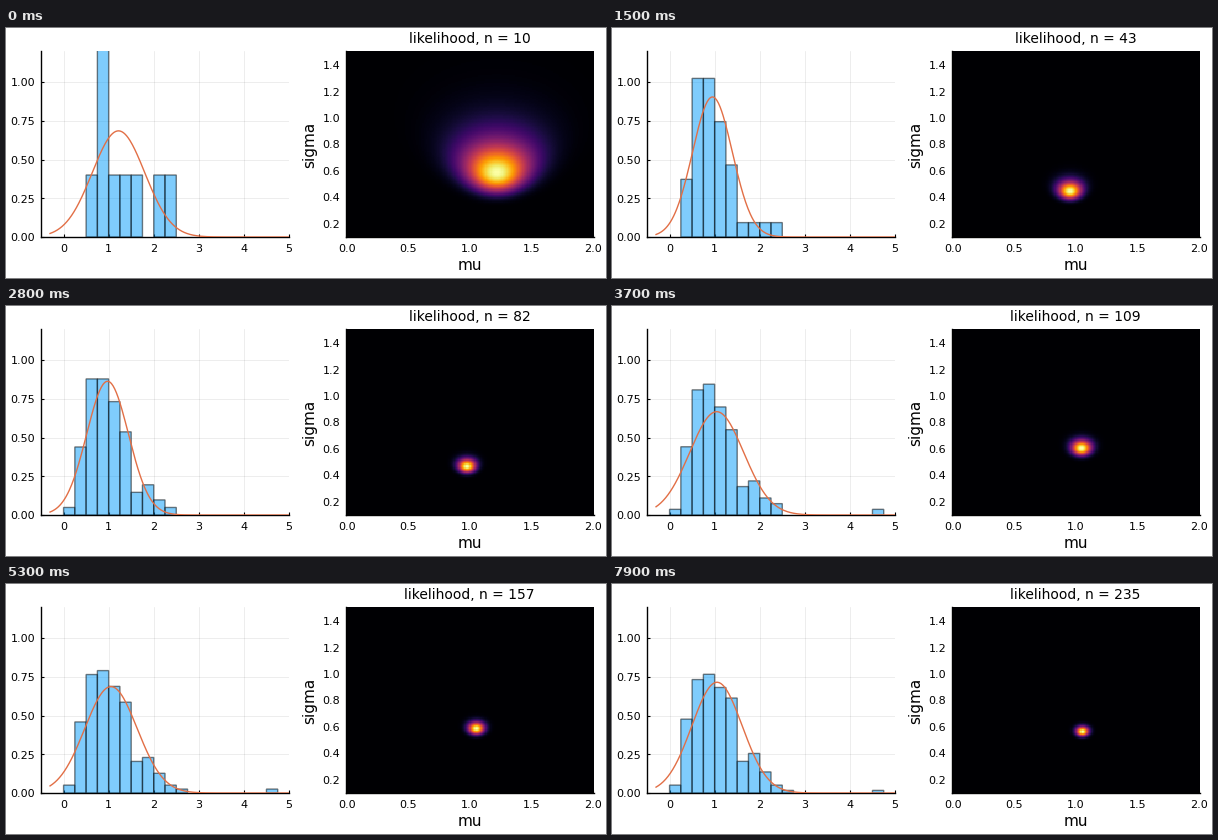
A matplotlib script that plays this animation: 600 by 250 pixels, repeating every 8 s.

```python
import numpy as np
import matplotlib.pyplot as plt
from matplotlib.animation import FuncAnimation

W, H, DPI = 600, 250, 100
TOP, BOTTOM = 23.0, 209.02
LEFT_PLOT = 35.02, 283.0
RIGHT_PLOT = 340.1, 588.0
BIN = 0.25
FRAMES, HOLD, START, STEP = 80, 4, 10, 3
OUTLIER, OUTLIER_AT = 4.72, 95

plt.rcParams["font.family"] = "DejaVu Sans"


def stream(counts):
    """Samples that fill the bins evenly, in proportion to their counts."""
    order = sorted(((k + 0.5) / c, b)
                   for b, c in enumerate(counts) for k in range(c))
    return [(b + 0.45) * BIN for _, b in order]


first = [0.57, 0.76, 0.78, 0.8, 0.85, 1.05, 1.35, 1.55, 2.1, 2.37]
early = stream([0, 4, 10, 7, 7, 4, 0, 1])
late = stream([3, 24, 32, 34, 32, 31, 11, 14, 7, 2, 1])
data = np.insert(first + early + late, OUTLIER_AT, OUTLIER)

fig = plt.figure(figsize=(W / DPI, H / DPI), dpi=DPI, facecolor="white")


def label(x, y, text, size=8, **kw):
    return fig.text(x / W, 1 - y / H, text, fontsize=size, **kw)


def add_axes(span, xlim, ylim):
    left, right = span
    ax = fig.add_axes([left / W, 1 - BOTTOM / H,
                       (right - left) / W, (BOTTOM - TOP) / H])
    ax.set(xlim=xlim, ylim=ylim)
    ax.spines[["top", "right"]].set_visible(False)
    ax.spines[["left", "bottom"]].set_linewidth(1)
    ax.tick_params(direction="in", length=2.2, width=0.8,
                   labelleft=False, labelbottom=False)
    ax.set_axisbelow(True)
    return ax


def add_ticks(ax, span, xs, ys, xfmt, yfmt):
    left, right = span
    x0, x1 = ax.get_xlim()
    y0, y1 = ax.get_ylim()
    ax.set_xticks(xs)
    ax.set_yticks(ys)
    for x in xs:
        px = left + (x - x0) / (x1 - x0) * (right - left)
        label(px, 224, format(x, xfmt), ha="center")
    for y in ys:
        py = BOTTOM - (y - y0) / (y1 - y0) * (BOTTOM - TOP)
        label(left - 6, py + 4.4, format(y, yfmt), ha="right")


# Histogram with the fitted normal density
hist = add_axes(LEFT_PLOT, (-0.5, 5), (0, 1.2))
add_ticks(hist, LEFT_PLOT, range(6), np.arange(5) * 0.25, "d", ".2f")
hist.grid(color="black", alpha=0.1, linewidth=0.5)
edges = np.arange(0, 5 + BIN, BIN)
bars = hist.bar(edges[:-1], np.zeros(len(edges) - 1), BIN, align="edge",
                facecolor=(0, 0.604, 0.98, 0.5), edgecolor=(0, 0, 0, 0.5),
                linewidth=1, zorder=2.6)
for bar in bars:
    bar.set_snap(False)
xs = np.linspace(-0.3, 5, 300)
curve, = hist.plot(xs, xs * 0, color="#e26f46", linewidth=1, zorder=3)

# Likelihood surface over mu and sigma
CELL = 0.01
mus = np.arange(0, 2 + CELL / 2, CELL)
sigmas = np.arange(0.1, 1.5 + CELL / 2, CELL)[:, None]
xlim = -CELL / 2, 2 + CELL / 2
ylim = 0.1 - CELL / 2, 1.5 + CELL / 2
heat = add_axes(RIGHT_PLOT, xlim, ylim)
add_ticks(heat, RIGHT_PLOT, np.arange(5) * 0.5, np.arange(1, 8) * 0.2,
          ".1f", ".1f")
image = heat.imshow(np.zeros((len(sigmas), len(mus))), cmap="inferno",
                    vmin=0, vmax=1, extent=(*xlim, *ylim), origin="lower",
                    aspect="auto", interpolation="nearest")
title = label(463.4, 15, "", 10, ha="center")
label(464, 242.5, "mu", 11, ha="center")
label(303.6, 116.5, "sigma", 11, ha="center", va="center", rotation=90)


def draw(i):
    n = START + STEP * max(0, i - HOLD)
    part = data[:n]
    mu, sd = part.mean(), part.std()

    counts, _ = np.histogram(part, edges)
    for bar, c in zip(bars, counts):
        bar.set_height(c / (n * BIN))
        bar.set_visible(c > 0)
    curve.set_ydata(np.exp(-((xs - mu) / sd) ** 2 / 2)
                    / (sd * np.sqrt(2 * np.pi)))

    spread = sd ** 2 + (mus - mu) ** 2
    loglik = -n * np.log(sigmas) - n * spread / (2 * sigmas ** 2)
    image.set_data(np.exp(loglik - loglik.max()))
    title.set_text(f"likelihood, n = {n}")
    return [*bars, curve, image, title]


anim = FuncAnimation(fig, draw, frames=FRAMES, interval=100,
                     repeat=True, repeat_delay=0, blit=False)
plt.show()
```
